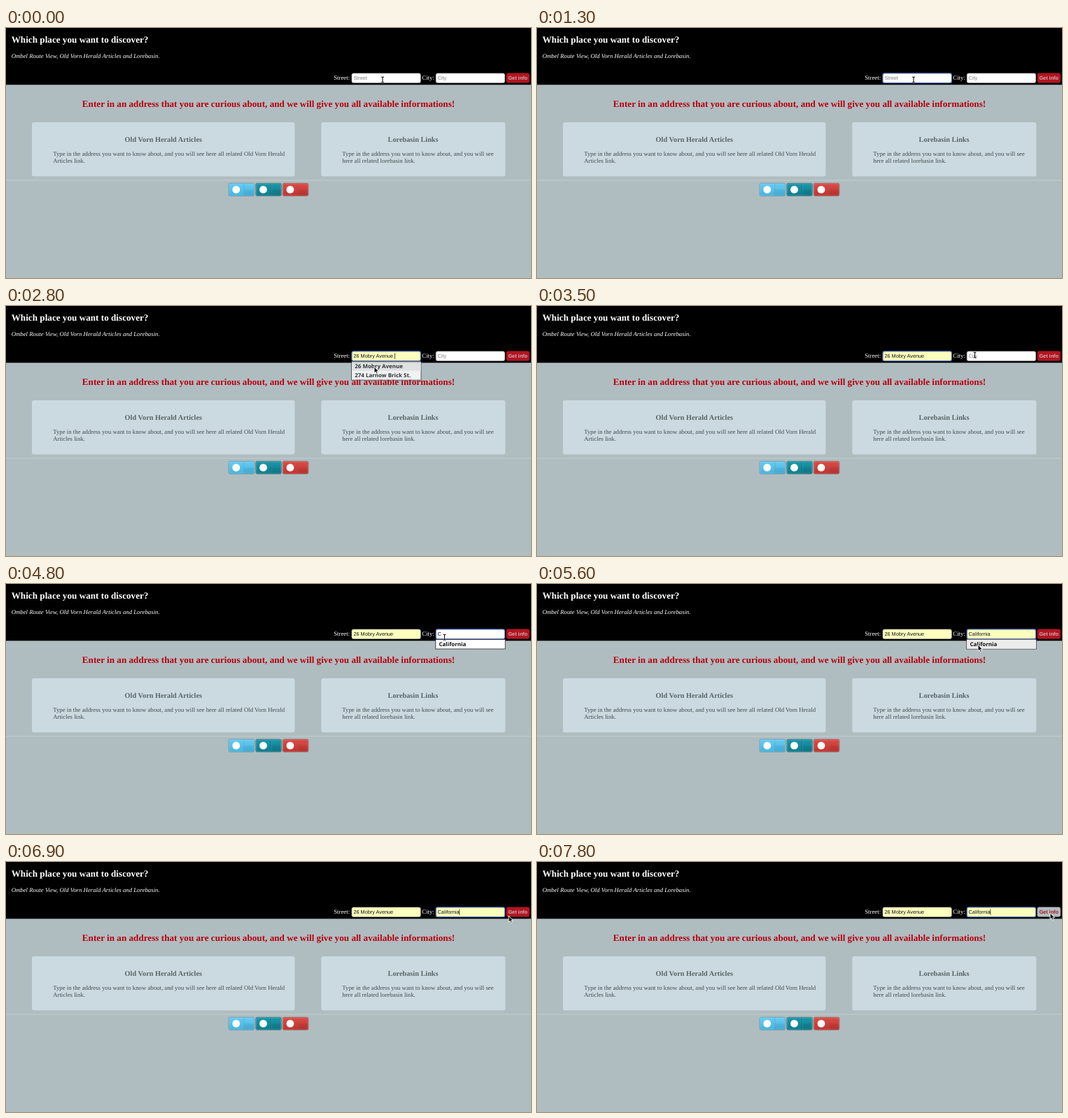
An HTML page that plays this animation: 750x358 px, repeating every 8 s.

```html
<!DOCTYPE html>
<html lang="en">
<head>
<meta charset="utf-8">
<title>Place finder</title>
<style>
  html, body { margin: 0; width: 100%; height: 100%; overflow: hidden; background: #afbdc0; }
  svg { display: block; width: 750px; height: 358px; }
  text { white-space: pre; text-rendering: geometricPrecision; font: 8.78px "Liberation Serif", serif; }
  .title { font-size: 13.18px; font-weight: bold; fill: #fff; }
  .intro { font-style: italic; fill: #fff; }
  .label { fill: #fff; }
  .lead { font-size: 13.18px; font-weight: bold; fill: #b8000e; text-anchor: middle; }
  .head { font-size: 10.28px; font-weight: bold; fill: #586669; text-anchor: middle; }
  .body { fill: #414c50; }
  .field, .go { font: 7.32px "Liberation Sans", sans-serif; }
  .go { font-weight: bold; text-anchor: middle; }
  .option { font: bold 7.95px "Open Sans", sans-serif; fill: #111; }
</style>
</head>
<body>
<svg id="stage" viewBox="0 0 750 358">
  <defs>
    <linearGradient id="blue" x2="0" y2="1"><stop stop-color="#68cdf3"/><stop offset="1" stop-color="#45b3df"/></linearGradient>
    <linearGradient id="teal" x2="0" y2="1"><stop stop-color="#1b98aa"/><stop offset="1" stop-color="#0c7b8d"/></linearGradient>
    <linearGradient id="red" x2="0" y2="1"><stop stop-color="#dc4d47"/><stop offset="1" stop-color="#bf322e"/></linearGradient>
  </defs>
  <rect width="750" height="358" fill="#afbdc0"/>
  <rect width="750" height="81.3"/>
  <text class="title" x="7.7" y="21.2">Which place you want to discover?</text>
  <text class="intro" x="7.7" y="43.1">Ombel Route View, Old Vorn Herald Articles and Lorebasin.</text>
  <text class="label" x="468.2" y="73.7">Street:</text>
  <text class="label" x="594.3" y="73.7">City:</text>
  <text class="lead" x="375" y="112.6">Enter in an address that you are curious about, and we will give you all available informations!</text>

  <g fill="#cbdae0">
    <rect x="37" y="135" width="375.5" height="77.5" rx="3"/>
    <rect x="450.3" y="135" width="263" height="77.5" rx="3"/>
  </g>
  <text class="head" x="224.8" y="163">Old Vorn Herald Articles</text>
  <text class="body" x="67.2" y="183.4">Type in the address you want to know about, and you will see here all related Old Vorn Herald</text>
  <text class="body" x="67.2" y="193.2">Articles link.</text>
  <text class="head" x="581.6" y="163">Lorebasin Links</text>
  <text class="body" x="480.3" y="183.4">Type in the address you want to know about, and you will see</text>
  <text class="body" x="480.3" y="193.2">here all related lorebasin link.</text>

  <rect y="217" width="750" height=".6" fill="#9fadb0"/>
  <rect y="217.6" width="750" height=".7" fill="#d3dcde"/>
  <g id="badges"></g>
  <g id="form"></g>
  <g id="pointer">
    <path id="arrow" d="M0 0V9.2L2.1 7.3L3.6 10.6L5.2 9.9L3.8 6.7H6.6Z" fill="#111" stroke="#fff" stroke-width=".9"/>
    <g id="beam" fill="none">
      <path d="M-2-4Q0-4 0-3Q0-4 2-4M0-3V3M-2 4Q0 4 0 3Q0 4 2 4" stroke="#fff" stroke-width="2" opacity=".7"/>
      <path d="M-2-4Q0-4 0-3Q0-4 2-4M0-3V3M-2 4Q0 4 0 3Q0 4 2 4" stroke="#111" stroke-width="1.1"/>
    </g>
  </g>
</svg>
<script>
const LOOP = 8000, STEP = 100;
const $ = id => document.getElementById(id);

function add(parent, tag, attrs, text) {
  const el = document.createElementNS("http://www.w3.org/2000/svg", tag);
  set(el, attrs);
  if (text) el.textContent = text;
  parent.append(el);
  return el;
}
function set(el, attrs) {
  for (const k in attrs) el.setAttribute(k, attrs[k]);
}
const show = (el, on) => set(el, { visibility: on ? "visible" : "hidden" });

// Share buttons
[["blue", 317.8, "#5c8799"], ["teal", 356.5, "#3d6c74"], ["red", 395, "#8a5352"]].forEach(([name, x, edge]) => {
  const g = add($("badges"), "g", { transform: `translate(${x} 222)` });
  add(g, "rect", { x: .3, y: .3, width: 36.6, height: 18.2, rx: 2.2, fill: `url(#${name})`, stroke: edge, "stroke-width": .7 });
  add(g, "rect", { x: 1, y: 1, width: 35.2, height: 16.8, rx: 1.6, fill: "none", stroke: "#fff", "stroke-width": .6, opacity: .3 });
  add(g, "rect", { x: 22.6, y: 9.3, width: 13.6, height: 8.6, fill: "#000", opacity: .06 });
  add(g, "rect", { x: 22, y: .8, width: .6, height: 17, fill: "#000", opacity: .28 });
  add(g, "rect", { x: 22.6, y: .8, width: .5, height: 17, fill: "#fff", opacity: .25 });
  add(g, "circle", { cx: 11, cy: 9.4, r: 5.4, fill: "#fff" });
});

// Each field lists its own moments in ms
const fields = [
  {
    x: 493.8, hint: "Street", key: "2", value: "26 Mobry Avenue ",
    options: ["26 Mobry Avenue", "274 Larnow Brick St."],
    focus: [700, 3700], typed: 1400, hover: 2300, picked: 2800,
    caret: [[700, 1200], [1400, 2000], [2800, 3300]]
  },
  {
    x: 614, hint: "City", key: "C", value: "California",
    options: ["California"],
    focus: [3700, LOOP], typed: 4200, hover: 5000, picked: 6500,
    caret: [[3700, 4200], [4200, 4700], [6500, 7000], [7600, LOOP]]
  }
];

const form = $("form");
for (const f of fields) {
  f.box = add(form, "rect", { x: f.x + .2, y: 64.9, width: 98.3, height: 13.7, rx: 2.4 });
  f.text = add(form, "text", { class: "field", x: f.x + 2.6, y: 74 });
  f.bar = add(form, "rect", { y: 67.5, width: .7, height: 8.4 });
}
const goBox = add(form, "rect", { x: 714.6, y: 64.6, width: 33.3, height: 13.9, rx: 3 });
const goText = add(form, "text", { class: "go", x: 731.2, y: 74.1 }, "Get info");
for (const f of fields) {
  const h = 13.1 * f.options.length + .6;
  f.menu = add(form, "g", { transform: `translate(${f.x - .2} 79.3)` });
  add(f.menu, "rect", { width: 99.4, height: h, fill: "#fff", stroke: "#222", "stroke-width": .8 });
  f.mark = add(f.menu, "rect", { x: .4, y: .4, width: 98.6, height: 13, fill: "#ececec" });
  f.options.forEach((o, i) => add(f.menu, "text", { class: "option", x: 4.7, y: 9.5 + 13.1 * i }, o));
}

// Pointer stops: time, x, y
const path = [
  [0, 538, 74], [1800, 538, 74], [1900, 535, 78], [2300, 528, 86], [2700, 526, 87], [2800, 526, 87],
  [3400, 622, 71], [3500, 625.5, 70], [3600, 626, 70.5], [4600, 626, 70.5], [5000, 627, 82],
  [5400, 629, 88], [5600, 630, 87], [6400, 630, 87], [6900, 718, 77], [7300, 732, 72.5],
  [7500, 732, 72.5], [7800, 733, 73], [LOOP, 733, 73]
];
function pointerAt(t) {
  const i = path.findIndex(p => p[0] > t);
  const [t0, x0, y0] = path[i - 1], [t1, x1, y1] = path[i];
  const k = (t - t0) / (t1 - t0);
  return [x0 + (x1 - x0) * k, y0 + (y1 - y0) * k];
}

function drawField(f, t) {
  const filled = t >= f.hover, typed = t >= f.typed;
  const focused = t >= f.focus[0] && t < f.focus[1];
  const text = filled ? f.value : typed ? f.key : f.hint;
  if (f.text.textContent !== text) f.text.textContent = text;
  set(f.text, { fill: typed ? "#111" : "#808080" });
  set(f.box, {
    fill: filled ? "#faffbd" : "#fff",
    stroke: focused ? "#5b78bd" : "#a8a8a8",
    "stroke-width": focused ? 1.2 : .7
  });
  const caret = f.caret.some(([a, b]) => t >= a && t < b);
  show(f.bar, caret);
  if (caret) set(f.bar, { x: f.x + 2.6 + (typed ? f.text.getComputedTextLength() : 0) });
  const open = typed && t < f.picked + STEP;
  set(f.menu, { display: open ? "inline" : "none", opacity: t >= f.picked ? .8 : 1 });
  set(f.mark, { opacity: filled ? 1 : 0 });
}

function draw(now) {
  const t = Math.floor(now % LOOP / STEP) * STEP;
  for (const f of fields) drawField(f, t);

  const hot = t >= 7000;
  set(goBox, { fill: hot ? "#b0bdc1" : "#b51420" });
  set(goText, { fill: hot ? "#b51420" : "#c3b6ba" });

  const [x, y] = pointerAt(t);
  const inField = y < 79 && fields.some(f => x > f.x && x < f.x + 98.6);
  set($("pointer"), { transform: `translate(${x} ${y})` });
  show($("beam"), inField);
  show($("arrow"), !inField);
}

const start = performance.now();
function tick() {
  draw(performance.now() - start);
  requestAnimationFrame(tick);
}
tick();
</script>
</body>
</html>
```
